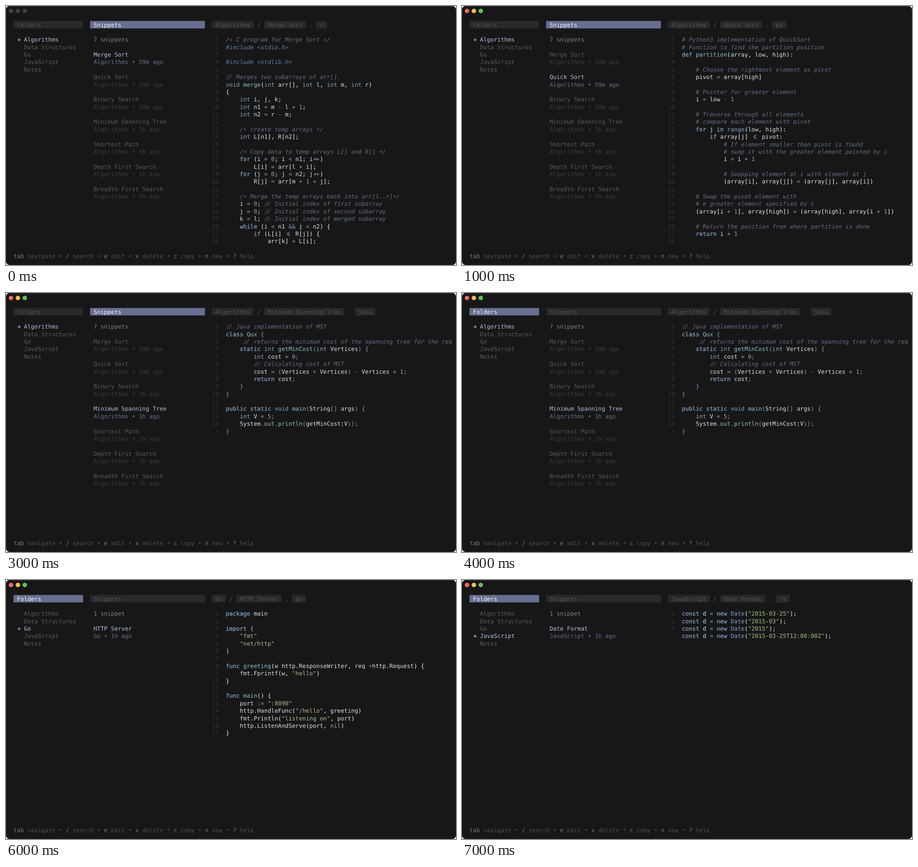
Animation of 985 by 568 pixels, one loop 8 s. Source, as an HTML page with a canvas:

```html
<!DOCTYPE html>
<html lang="en">
<head>
<meta charset="utf-8">
<title>Snippet manager</title>
<style>
html, body { margin: 0; width: 100%; height: 100%; overflow: hidden; background: #fff; }
canvas { display: block; width: 985px; height: 568px; }
</style>
</head>
<body>
<canvas id="stage"></canvas>
<script>
const W = 985, H = 568, LOOP = 8000, STEP = 1000;
const CELL = 7.62, ROW = 16.37, LEFT = 16.4, TOP = 41;
const FONT = '12.66px "DejaVu Sans Mono", "Noto Sans Mono", monospace';
const CODE_COL = 61, CODE_COLS = 65, CODE_ROWS = 28;

const ui = {
  back: '#171717', bar: '#28292c', active: '#666f91', barText: '#525355', activeText: '#f4f5f8',
  primary: '#afbee1', subdued: '#64708d', gray: '#5a5a5a', count: '#808080',
  faint: '#3b3c3f', number: '#323336', key: '#787878', help: '#4e4e4e'
};
const syntax = {
  plain: '#d8dee9', punct: '#eceff4', op: '#81a1c1', fn: '#88c0d0', name: '#8fbcbb',
  num: '#b48ead', str: '#a3be8c', comment: '#616e87', pre: '#5e81ac'
};
const words = list => new Set(list.split(' '));
const KEYWORDS = words('for while if return def in pub fn let mut as class static public package type struct func false true const new import');
const TYPES = words('int void bool i8 i32 usize make range Some None Op Date nil');
const TOKEN = /\/\/.*|\/\*.*|#.*|"[^"]*"|\d+|\w+|<=|==|!=|->|\+\+|:=|&&|\s+|./g;

const programs = {
merge: `/* C program for Merge Sort */
#include <stdio.h>

#include <stdlib.h>

// Merges two subarrays of arr[].
void merge(int arr[], int l, int m, int r)
{
    int i, j, k;
    int n1 = m - l + 1;
    int n2 = r - m;

    /* create temp arrays */
    int L[n1], R[n2];

    /* Copy data to temp arrays L[] and R[] */
    for (i = 0; i < n1; i++)
        L[i] = arr[l + i];
    for (j = 0; j < n2; j++)
        R[j] = arr[m + 1 + j];

    /* Merge the temp arrays back into arr[l..r]*/
    i = 0; // Initial index of first subarray
    j = 0; // Initial index of second subarray
    k = l; // Initial index of merged subarray
    while (i < n1 && j < n2) {
        if (L[i] <= R[j]) {
            arr[k] = L[i];
`,
quick: `# Python3 implementation of QuickSort
# Function to find the partition position
def partition(array, low, high):

    # Choose the rightmost element as pivot
    pivot = array[high]

    # Pointer for greater element
    i = low - 1

    # Traverse through all elements
    # compare each element with pivot
    for j in range(low, high):
        if array[j] <= pivot:
            # If element smaller than pivot is found
            # swap it with the greater element pointed by i
            i = i + 1

            # Swapping element at i with element at j
            (array[i], array[j]) = (array[j], array[i])

    # Swap the pivot element with
    # e greater element specified by i
    (array[i + 1], array[high]) = (array[high], array[i + 1])

    # Return the position from where partition is done
    return i + 1

`,
binary: `// Binary search, iterative.
pub fn iterative(a: &[i32], len: usize, target_value: &i32) -> Op
    let mut low: i8 = 0;
    let mut high: i8 = len as i8 - 1;

    while low <= high {
        let mid = ((high - low) / 2) + low;
        let mid_index = mid as usize;
        let val = &a[mid_index];

        if val == target_value {
            return Some(mid_index);
        }

        // Search values that are greater than val - to right of
        if val < target_value {
            low = mid + 1;
        }

        // Search values that are less than val - to the left of
        if val > target_value {
            high = mid - 1;
        }
    }
    None
}`,
tree: `// Java implementation of MST
class Qux {
     // returns the minimum cost of the spanning tree for the req
    static int getMinCost(int Vertices) {
        int cost = 0;
        // Calculating cost of MST
        cost = (Vertices * Vertices) - Vertices + 1;
        return cost;
    }
}

public static void main(String[] args) {
    int V = 5;
    System.out.println(getMinCost(V));
}`,
queue: `package main

type Queue struct {
    len        int
    head, tail int
    q          []int
}

func New(n int) *Queue {
    return &Queue{n, 0, 0, make([]int, n)}
}

func (p *Queue) Enqueue(x int) bool {
    p.q[p.tail] = x
    ntail := (p.tail + 1) % p.len
    ok := false
    if ntail != p.head {
        p.tail = ntail
        ok = true
    }
    return ok
}

func (p *Queue) Dequeue() (int, bool) {
    if p.head == p.tail {
        return 0, false
    }
    x := p.q[p.head]
`,
server: `package main

import (
    "fmt"
    "net/http"
)

func greeting(w http.ResponseWriter, req *http.Request) {
    fmt.Fprintf(w, "hello")
}

func main() {
    port := ":8090"
    http.HandleFunc("/hello", greeting)
    fmt.Println("listening on", port)
    http.ListenAndServe(port, nil)
}
`,
date: `const d = new Date("2015-03-25");
const d = new Date("2015-03");
const d = new Date("2015");
const d = new Date("2015-03-25T12:00:00Z");`
};

const folders = ['Algorithms', 'Data Structures', 'Go', 'JavaScript', 'Notes'];
const algorithms = third => [
  ['Merge Sort', '59m'], ['Quick Sort', '59m'], ['Binary Search', third], ['Minimum Spanning Tree', '1h'],
  ['Shortest Path', '1h'], ['Depth First Search', '1h'], ['Breadth First Search', '1h']
];
const early = algorithms('59m'), late = algorithms('1h');
const scene = (folder, list, pick, ext, program, onFolders, blurred = false) =>
  ({ folder, list, pick, ext, program, onFolders, blurred });
const scenes = [
  scene(0, early, 0, 'c', 'merge', false, true),
  scene(0, early, 1, 'py', 'quick', false),
  scene(0, early, 2, 'rs', 'binary', false),
  scene(0, late, 3, 'java', 'tree', false),
  scene(0, late, 3, 'java', 'tree', true),
  scene(1, [['Queue', '58m'], ['Stack', '58m'], ['Binary Tree', '1h']], 0, 'go', 'queue', true),
  scene(2, [['HTTP Server', '1h']], 0, 'go', 'server', true),
  scene(3, [['Date Format', '1h']], 0, 'js', 'date', true)
];

const canvas = document.getElementById('stage');
const ratio = window.devicePixelRatio || 1;
canvas.width = W * ratio;
canvas.height = H * ratio;
const ctx = canvas.getContext('2d');
ctx.scale(ratio, ratio);
ctx.textRendering = 'geometricPrecision';
ctx.lineJoin = 'round';

const cellX = col => LEFT + col * CELL;
const rowY = row => TOP + row * ROW;

// Every glyph sits on the terminal grid; squeeze pulls the first two together.
function text(str, col, row, color, style = '', squeeze = 0) {
  ctx.font = `${style === 'italic' ? style : ''} ${FONT}`;
  ctx.fillStyle = ctx.strokeStyle = color;
  ctx.lineWidth = 0.3;
  [...str].forEach((ch, i) => {
    if (ch === ' ') return;
    const x = cellX(col + i) + (i === 0 ? squeeze : i === 1 ? -squeeze : 0);
    const y = rowY(row) + (ch === '*' ? 6.8 : 4.6);
    ctx.fillText(ch, x, y);
    if (style === 'strong') ctx.strokeText(ch, x, y);
  });
}

function bar(col, width, label, active = false) {
  ctx.fillStyle = active ? ui.active : ui.bar;
  ctx.fillRect(cellX(col), rowY(0) - ROW / 2, width * CELL, ROW);
  text(label, col + 1, 0, active ? ui.activeText : ui.barText);
}

function tag(col, label) {
  bar(col, label.length + 2, label);
  return col + label.length + 2;
}

// Stroked symbols, relative to the middle of the cell's left edge.
const symbols = {
  '<=': [[10.6, -4, 4.6, -1.2, 10.6, 1.6], [4.6, 1.6, 10.6, 4.4]],
  '==': [[1.2, -1.8, 14, -1.8], [1.2, 2, 14, 2]],
  '!=': [[1.2, -1.8, 14, -1.8], [1.2, 2, 14, 2], [10, -5, 5.2, 5]],
  '->': [[0.8, 0, 14, 0], [10.5, -3.5, 14, 0, 10.5, 3.5]],
  '→': [[0.6, 0, 6.8, 0], [3.9, -3.1, 7, 0, 3.9, 3.1]]
};

function symbol(name, col, row, color) {
  const x = cellX(col), y = rowY(row) + 0.5;
  ctx.strokeStyle = color;
  ctx.lineWidth = 1.1;
  ctx.beginPath();
  for (const path of symbols[name]) {
    for (let i = 0; i < path.length; i += 2) {
      ctx[i ? 'lineTo' : 'moveTo'](x + path[i], y + path[i + 1]);
    }
  }
  ctx.stroke();
}

function classify(token, before, after, ext) {
  if (token.startsWith('#include')) return ['pre', 'italic'];
  if (/^(\/\/|\/\*|#)/.test(token)) return ['comment', 'italic'];
  if (token[0] === '"') return ['str'];
  if (/^\d/.test(token)) return ['num'];
  if (KEYWORDS.has(token)) return ['op', 'strong'];
  if (TYPES.has(token)) return ['op'];
  if (/^\w/.test(token)) {
    if (/class $/.test(before) || (ext === 'java' && /\.$/.test(before))) return ['name'];
    return [after === '(' && /(int|void|func|fn|def|Queue\)) $/.test(before) ? 'fn' : 'plain'];
  }
  if (ext === 'java') return ['op'];
  if (ext === 'go' && /^[=<>]$/.test(token)) return ['punct'];
  return [/[-+*\/%&|<>=!]/.test(token) ? 'op' : 'punct'];
}

function codeLine(line, row, ext) {
  for (const match of line.slice(0, CODE_COLS).matchAll(TOKEN)) {
    const token = match[0], at = match.index;
    const [kind, style] = classify(token, line.slice(0, at), line[at + token.length], ext);
    if (symbols[token]) symbol(token, CODE_COL + at, row, syntax[kind]);
    else text(token, CODE_COL + at, row, syntax[kind], style, /^(\/\/|\+\+)/.test(token) ? 1.1 : 0);
  }
}

function drawWindow(blurred) {
  ctx.fillStyle = '#fff';
  ctx.fillRect(0, 0, W, H);
  ctx.fillStyle = ui.back;
  ctx.beginPath();
  ctx.roundRect(0, 0, W, H, 8);
  ctx.fill();
  ctx.fillStyle = '#363636';
  ctx.fillRect(7, 0, W - 14, 1);
  ['#ee6a5f', '#f5bd4f', '#61c454'].forEach((color, i) => {
    ctx.fillStyle = blurred ? '#404040' : color;
    ctx.beginPath();
    ctx.arc(10.9 + i * 15.1, 10.9, 4.9, 0, Math.PI * 2);
    ctx.fill();
  });
}

function drawFolders({ folder, onFolders }) {
  bar(0, 20, 'Folders', onFolders);
  folders.forEach((name, i) => {
    const chosen = i === folder;
    if (chosen) symbol('→', 1, i + 2, ui.primary);
    text(name, 3, i + 2, chosen ? ui.primary : ui.gray);
  });
}

function drawSnippets({ folder, list, pick, onFolders }) {
  bar(22, 33, 'Snippets', !onFolders);
  text(`${list.length} snippet${list.length > 1 ? 's' : ''}`, 23, 2, ui.count);
  list.forEach(([name, age], i) => {
    const row = 4 + i * 3, chosen = i === pick;
    text(name, 23, row, chosen ? ui.primary : ui.gray);
    text(`${folders[folder]} • ${age} ago`, 23, row + 1, chosen ? ui.subdued : ui.faint);
  });
}

function drawCode({ folder, list, pick, ext, program }) {
  let col = tag(57, folders[folder]);
  text('/', col + 1, 0, ui.gray);
  col = tag(col + 3, list[pick][0]);
  text('.', col + 1, 0, ui.gray);
  tag(col + 3, ext);

  const lines = programs[program].split('\n');
  lines.slice(0, CODE_ROWS).forEach((line, i) => {
    const label = i === lines.length - 1 ? '~' : String(i + 1);
    text(label.padStart(2), 57, i + 2, ui.number);
    codeLine(line, i + 2, ext);
  });
}

function drawHelp() {
  let col = 0;
  ['tab navigate', '/ search', 'e edit', 'x delete', 'c copy', 'n new', '? help'].forEach((entry, i) => {
    if (i) {
      text('•', col + 1, 31, ui.help);
      col += 3;
    }
    const [key, action] = entry.split(' ');
    text(key, col, 31, ui.key);
    text(action, col + key.length + 1, 31, ui.help);
    col += entry.length;
  });
}

function draw(current) {
  drawWindow(current.blurred);
  drawFolders(current);
  drawSnippets(current);
  drawCode(current);
  drawHelp();
}

let shown = -1;
const start = performance.now();
function tick() {
  const index = Math.floor((performance.now() - start) % LOOP / STEP);
  if (index !== shown) draw(scenes[shown = index]);
  requestAnimationFrame(tick);
}
tick();
</script>
</body>
</html>
```
